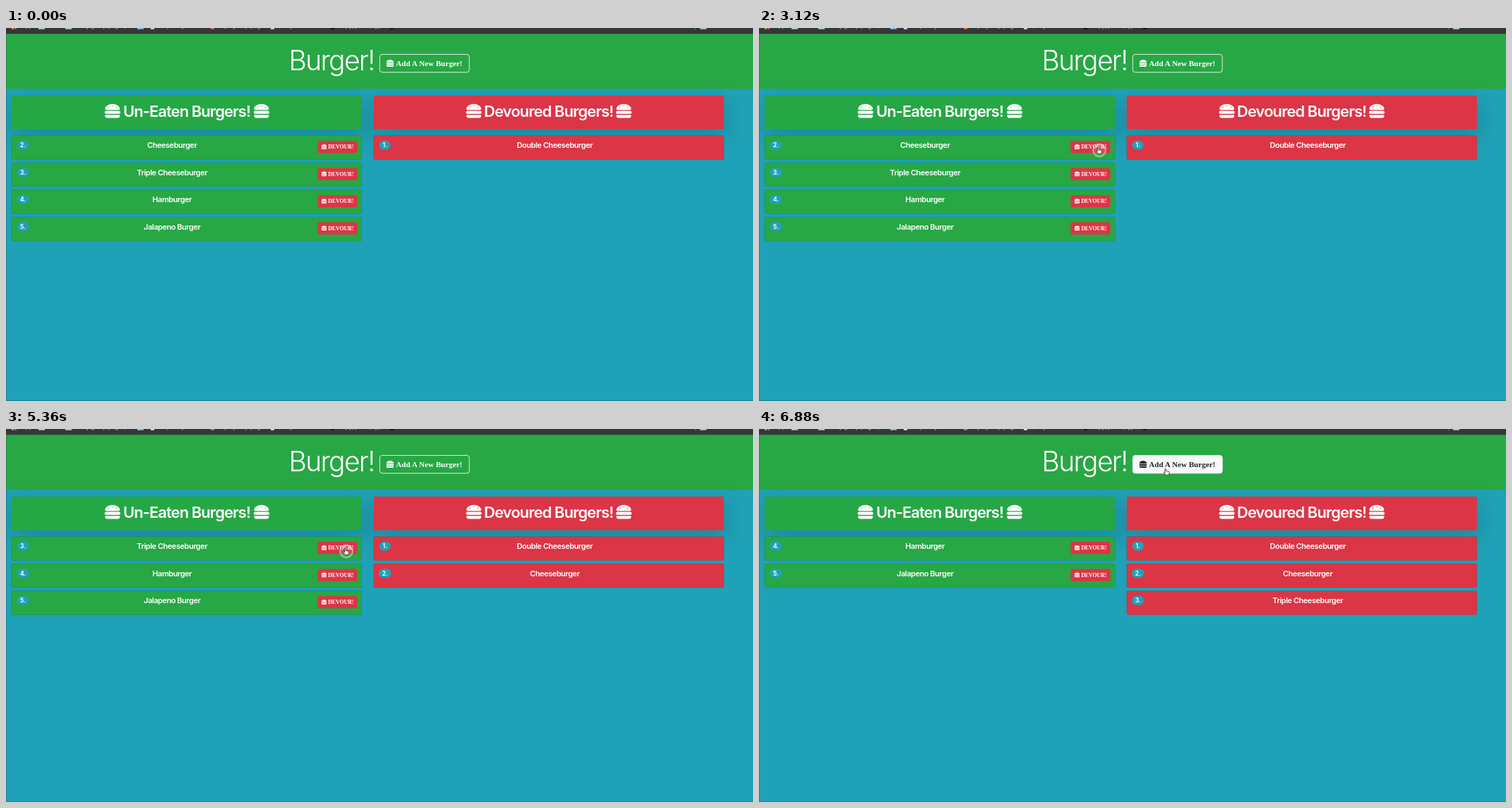
These frames come from a looping animation (1058x529 px, 8 s). An HTML page:

```html
<!DOCTYPE html>
<html lang="en">
<head>
<meta charset="utf-8">
<title>Burger!</title>
<style>
  html, body { margin: 0; width: 100%; height: 100%; overflow: hidden; background: #1fa2b8; }
  svg { display: block; width: 100%; height: 100%; fill: #fff; }
  text { font-family: Inter, sans-serif; font-optical-sizing: none; letter-spacing: -.043em; text-anchor: middle; }
  .title { font-size: 39px; font-weight: 300; }
  .heading { font-size: 22px; font-weight: 600; }
  .name { font-size: 11px; font-weight: 600; }
  .badge { font-size: 8.4px; font-weight: 700; letter-spacing: 0; }
  .serif { font: bold 11.1px "Liberation Serif", serif; letter-spacing: 0; text-anchor: start; }
  .small { font-size: 7.8px; }
  .bar text { font-size: 8px; letter-spacing: 0; text-anchor: start; fill: #ddd; }
  .green { fill: #28a745; }
  .red { fill: #dc3545; }
  .teal { fill: #1fa2b8; }
</style>
</head>
<body>
<svg viewBox="0 0 1058 529">
  <defs>
    <symbol id="burger" viewBox="0 0 512 512">
      <path fill-rule="evenodd" d="M58 224H454C488 224 508 180 488 148C448 83 360 32 256 32S64 83 24 148C4 180 24 224 58 224Z
        M112 128a16 16 0 1 0 32 0a16 16 0 1 0-32 0Z M240 96a16 16 0 1 0 32 0a16 16 0 1 0-32 0Z M368 128a16 16 0 1 0 32 0a16 16 0 1 0-32 0Z"/>
      <rect y="256" width="512" height="96" rx="48"/>
      <path d="M32 384H480Q496 384 496 400V416Q496 480 432 480H80Q16 480 16 416V400Q16 384 32 384Z"/>
    </symbol>
    <filter id="shadow" x="-.2" y="-2" width="1.4" height="6">
      <feDropShadow dy="11" stdDeviation="17" flood-opacity=".175"/>
    </filter>
  </defs>

  <rect class="teal" width="1058" height="529"/>
  <rect class="green" y="8" width="1058" height="78.3"/>
  <g class="bar" id="bar"><rect width="1058" height="8.3" fill="#35363a"/></g>

  <text class="title" x="461" y="60">Burger!</text>
  <g id="add">
    <rect x="529.4" y="37.4" width="126.8" height="25.4" rx="3.5" stroke="#f8f9fa" stroke-width=".9"/>
    <use href="#burger" x="538.4" y="44.4" width="11.2" height="11.2"/>
    <text class="serif" x="552.3" y="54.2">Add A New Burger!</text>
  </g>

  <g id="panels"></g>
  <g id="rows"></g>
  <path d="M.3 8V528.6H1058" fill="none" stroke="#164e5c" stroke-opacity=".6" stroke-width=".8"/>

  <circle id="ring" cx="482" cy="173.5" r="9" fill="#fff" fill-opacity=".12" stroke="#ddd" stroke-opacity=".75" stroke-width="1.4"/>
  <g id="cursor" stroke-linejoin="round">
    <path id="arrow" d="M0 0V8.6L2 6.8L3.4 9.8L4.8 9.2L3.5 6.3H6.2Z" fill="#000" stroke="#fff" stroke-width=".7"/>
    <path id="hand" d="M-.8 .8Q0-.6 .8 .8L1.3 3.6L4.6 4.2Q5.8 4.5 5.6 6L4.8 9.4H.6L-2 6.2Q-2.6 4.8-1.2 5L0 5.8Z" fill="#fff" stroke="#222" stroke-width=".8"/>
  </g>
</svg>
<script>
const $ = id => document.getElementById(id);
const LOOP = 8000, STEP = 80;
const burgers = ["Double Cheeseburger", "Cheeseburger", "Triple Cheeseburger", "Hamburger", "Jalapeno Burger"];
const swaps = [3360, 5600], clicks = [3120, 5360];

// Pointer tip: time, x, y
const path = [
  [240, 630, -6], [319, 630, -6], [320, 632, -20], [480, 635, -20], [560, 635, -3],
  [640, 634, 14], [720, 628, 75], [1000, 598, 190], [1280, 575, 251], [1360, 575, 251],
  [2080, 518, 207], [2240, 494, 190], [2640, 480, 169], [6240, 480, 169],
  [6400, 503, 140], [6640, 562, 75], [6880, 575.5, 56], [LOOP, 575.5, 56]
];

const icon = (x, y, size) => `<use href="#burger" x="${x}" y="${y}" width="${size}" height="${size}"/>`;

function panel(x, color, label, center, left, right) {
  return `<rect class="${color}" x="${x}" y="95.8" width="496" height="47.6" rx="1" filter="url(#shadow)"/>
    ${icon(left, 106.4, 22.4)}${icon(right, 106.4, 22.4)}
    <text class="heading" x="${center}" y="125.6">${label}</text>`;
}

function row(name, i, eatenCount) {
  const eaten = i < eatenCount, x = eaten ? 520.8 : 8;
  const y = 152.5 + 38.5 * (eaten ? i : i - eatenCount);
  const pill = i ? 17.4 : 16.2;
  const button = `<rect class="red" x="433.3" y="7.4" width="56.2" height="17.4" rx="2.4"/>
    ${icon(438.6, 12, 7.8)}<text class="serif small" x="448.2" y="18.7">DEVOUR!</text>`;
  return `<g transform="translate(${x} ${y})">
    <rect class="${eaten ? "red" : "green"}" width="496" height="34" rx="1.8" stroke="#000" stroke-opacity=".125" stroke-width=".7"/>
    <rect class="teal" x="${16 - pill / 2}" y="7.3" width="${pill}" height="12.6" rx="6.3"/>
    <text class="badge" x="16" y="16.6">${i + 1}.</text>
    <text class="name" x="${eaten ? 256.4 : 227.2}" y="17.8">${name}</text>
    ${eaten ? "" : button}</g>`;
}

function buildBar() {
  const marks = [[8, "#e0a030"], [12, "#d9534f"], [46, "#9fd89f"], [84, "#9fd89f"], [186, "#5bc0f0"],
    [205, "#ddd"], [290, "#e8703a"], [375, "#ddd"], [460, "#111"], [544, "#111"], [983, "#9fd89f"]];
  const labels = [[22, "Apps"], [58, "Folder"], [96, "Study group pages, diary"], [214, "Simple layout"],
    [299, "Deploy help page"], [383, "Query notes"], [470, "Copy, paste, type"], [554, "Reference"], [995, "Other"]];
  $("bar").innerHTML +=
    marks.map(([x, c]) => `<rect x="${x}" width="${x < 20 ? 3 : x > 200 && x < 980 ? 5 : 9}" height="1.8" fill="${c}"/>`).join("") +
    labels.map(([x, s]) => `<text x="${x}" y=".3">${s}</text>`).join("") +
    `<rect x="976" width=".7" height="2.5" fill="#888"/>`;
}

function pointerAt(t) {
  const k = path.findIndex(p => p[0] > t);
  const [t0, x0, y0] = path[k - 1], [t1, x1, y1] = path[k];
  const f = (t - t0) / (t1 - t0);
  return [x0 + (x1 - x0) * f, y0 + (y1 - y0) * f];
}

const show = (id, on) => $(id).setAttribute("visibility", on ? "visible" : "hidden");
let shownCount = 0;

function draw(t) {
  const eatenCount = 1 + swaps.filter(s => t >= s).length;
  if (eatenCount !== shownCount) {
    $("rows").innerHTML = burgers.map((name, i) => row(name, i, eatenCount)).join("");
    shownCount = eatenCount;
  }

  const hover = Math.min(1, Math.max(0, (t - 6640) / 150));
  const mix = (a, b) => Math.round(a + (b - a) * hover);
  $("add").style.fill = `rgb(${mix(255, 33)},${mix(255, 37)},${mix(255, 41)})`;
  $("add").firstElementChild.style.fill = `rgba(248,249,250,${hover})`;

  show("ring", clicks.some(c => t >= c && t < c + 160));
  const visible = t >= 240;
  const [x, y] = visible ? pointerAt(t) : [0, 0];
  const onDevour = x > 441 && x < 497 && y > 160 && y < 177;
  const onAdd = x > 529 && x < 656 && y > 37 && y < 63;
  $("cursor").setAttribute("transform", `translate(${x} ${y})`);
  show("arrow", visible && !onDevour && !onAdd);
  show("hand", visible && (onDevour || onAdd));
}

buildBar();
$("panels").innerHTML =
  panel(8, "green", "Un-Eaten Burgers!", 256, 139.6, 350.7) +
  panel(520.8, "red", "Devoured Burgers!", 768.6, 651.4, 863.8);

const start = performance.now();
function tick() {
  const t = (performance.now() - start) % LOOP;
  draw(Math.floor(t / STEP) * STEP);
  requestAnimationFrame(tick);
}
tick();
</script>
</body>
</html>
```
